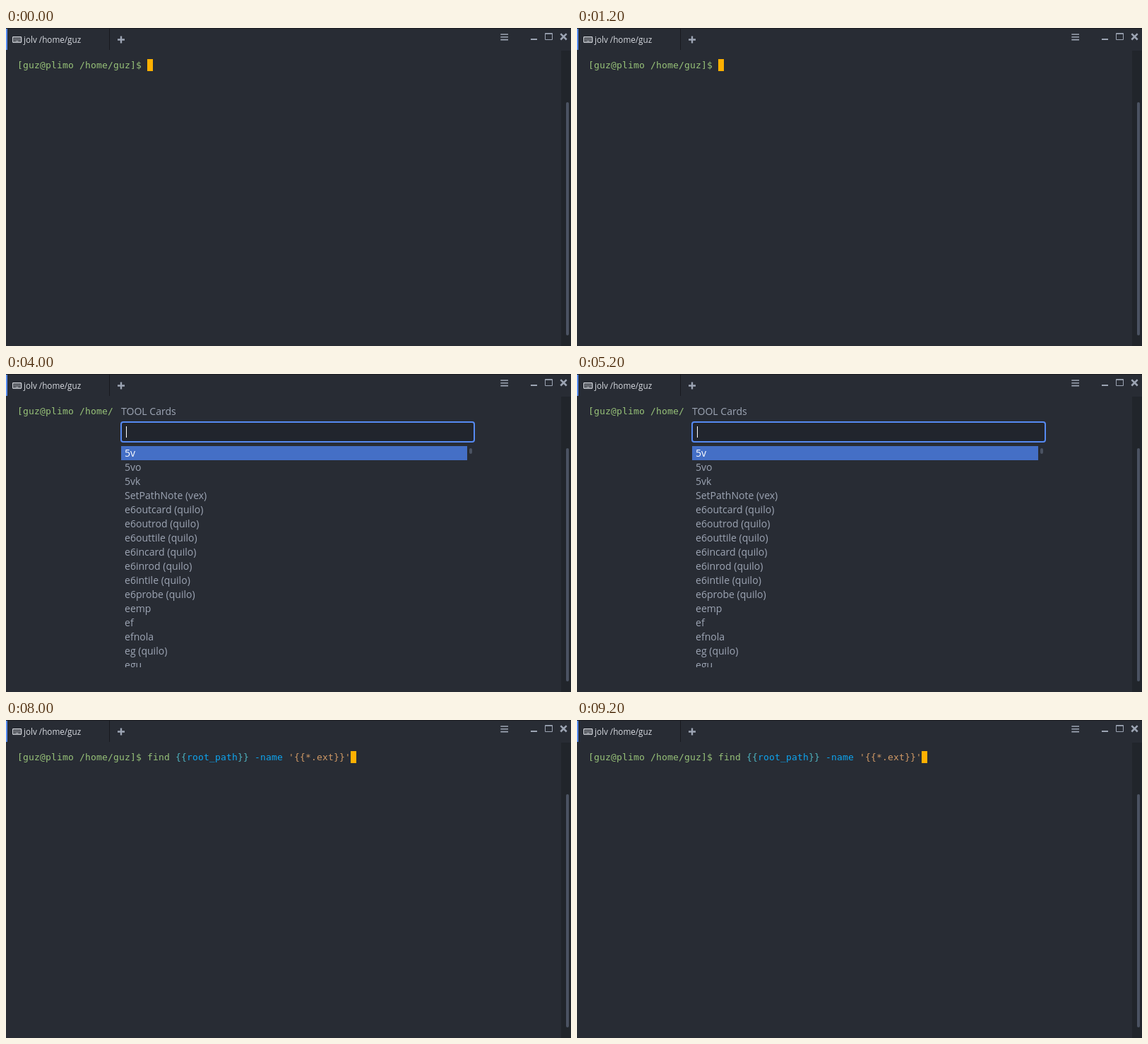
Write an HTML page that moves like this. It is 800 px wide and 450 px high and loops after 10 s.

```html
<!DOCTYPE html>
<html lang="en">
<head>
<meta charset="utf-8">
<title>Terminal command palette</title>
<style>
  :root {
    --bg: #282c34; --dark: #21252b; --line: #181a1f;
    --text: #9da5b4; --bright: #d7dae0; --accent: #568af2;
    --select: #446fc6; --thumb: #4b5362;
  }
  html, body { margin: 0; width: 100%; height: 100%; overflow: hidden; background: var(--bg); }
  #stage {
    position: relative; width: 800px; height: 450px; overflow: hidden;
    background: var(--bg); color: var(--text);
    font: 14.05px/20px "Open Sans", "Noto Sans", sans-serif;
  }
  #stage > *, .panel > * { position: absolute; white-space: pre; }

  .bar { left: 0; top: 0; fill: none; stroke: var(--text); }
  .tab { left: 25px; top: 8px; font-size: 11.7px; line-height: 16px; color: var(--bright); }
  .gutter { left: 786px; top: 32px; width: 14px; height: 418px; background: var(--dark); }
  .thumb { left: 793px; top: 105px; width: 4px; height: 330px; border-radius: 2px; background: var(--thumb); }

  .term {
    top: 44px; font: 13px/17px "DejaVu Sans Mono", monospace;
    letter-spacing: calc(8px - 1ch); color: #98c379;
  }
  .prompt { left: 16px; }
  .typed { left: 200px; }
  .cursor { display: inline-block; width: 8px; height: 17px; background: #ffb000; vertical-align: top; }
  .op { color: #4fb4c0; }
  .arg { color: #0ea5f0; }
  .str { color: #d19a66; }

  /* Each scene holds for a fifth of the loop. */
  .scene { visibility: hidden; animation: show 10s step-end infinite; animation-delay: calc((var(--n) - 5) * 2s); }
  @keyframes show { 0% { visibility: visible; } 20%, 100% { visibility: hidden; } }

  .panel { left: 152px; top: 33px; width: 522px; height: 400px; background: var(--bg); }
  .title { left: 11px; top: 10px; }
  .input {
    left: 10px; top: 34px; width: 502px; height: 30px; box-sizing: border-box;
    border: 2px solid var(--accent); border-radius: 4px; background: #21252d;
    padding: 3px 6px; color: var(--bright);
  }
  .caret { position: absolute; top: 5px; width: 1px; height: 16px; background: #fff; }
  .list { left: 11px; top: 69px; width: 500px; height: 313px; overflow: hidden; }
  .row { padding-left: 5px; }
  .row.on { background: var(--select); color: #fff; }
  .icons .row { padding-left: 53px; }
  .long .row { margin-right: 10px; }
  .nub { left: 504px; top: 72px; width: 4px; height: 8px; border-radius: 2px; background: var(--thumb); }
  .pencil { left: 35px; top: 70px; fill: var(--text); }
</style>
</head>
<body>
<div id="stage">
  <div class="gutter"></div>
  <div class="thumb"></div>
  <svg class="bar" width="800" height="32" viewBox="0 0 800 32">
    <path d="M0 .5H800M146.5 0V31" stroke="#181a1f"/>
    <path d="M1 1V31" stroke="#568af2" stroke-width="2"/>
    <g stroke="#d7dae0">
      <rect x="9.6" y="12.6" width="12" height="7.8" rx=".8" stroke-width="1.2"/>
      <path d="M11.3 14.7H20.3M11.3 16.5H20.3" stroke-width="1.1" stroke-dasharray="1.2 .75"/>
      <path d="M11.3 18.5H12.5M13.3 18.5H18M18.9 18.5H20.1" stroke-width="1.1"/>
    </g>
    <path d="M158 16.5H168M163 11.5V21.5" stroke-width="2.4"/>
    <path d="M700.3 9H711M700.3 12.8H711M700.3 16.6H711" stroke-width="1.6"/>
    <path d="M743 16H752" stroke-width="2"/>
    <path d="M763.5 7.5H773.5V16.5H763.5ZM763 8.3H774"/>
    <path d="M785.3 8.1L793.7 16.5M793.7 8.1L785.3 16.5" stroke-width="2.5"/>
  </svg>
  <div class="tab">jolv /home/guz</div>

  <div class="term prompt">[guz@plimo /home/guz]$ </div>
  <div class="term typed scene" style="--n:0"><span class="cursor"></span></div>
  <div class="term typed scene" style="--n:4">find <span class="op">{{</span><span class="arg">root_path</span><span class="op">}}</span> <span class="arg">-name</span> <span class="str">'{{*.ext}}'</span><span class="cursor"></span></div>
</div>

<script>
  const stage = document.getElementById("stage");

  const pencil = `<svg class="pencil" width="17" height="17" viewBox="0 0 17 17">
    <path d="M1 16L1.8 11.6L10 3.4L13.6 7L5.4 15.2ZM10.9 2.5L12.3 1.2Q13 .6 13.7 1.2L15.8 3.3Q16.4 4 15.8 4.7L14.5 6.1Z"/></svg>`;

  function addPanel({ n, title, rows, on = 0, typed = "", caret, kind = "", extra = "" }) {
    const mark = caret === undefined ? "" : `<i class="caret" style="left:${caret}px"></i>`;
    const items = rows.map((row, i) => `<div class="row${i === on ? " on" : ""}">${row}</div>`).join("");
    stage.insertAdjacentHTML("beforeend",
      `<div class="panel scene" style="--n:${n}"><div class="title">${title}</div>` +
      `<div class="input">${typed}${mark}</div><div class="list ${kind}">${items}</div>${extra}</div>`);
  }

  addPanel({
    n: 1, title: "Command Palette", typed: "tl", caret: 16, on: 1,
    kind: "icons", extra: pencil, rows: ["Edit Title", "TOOL Cards"]
  });

  addPanel({
    n: 2, title: "TOOL Cards", caret: 6, kind: "long", extra: '<div class="nub"></div>',
    rows: [
      "5v", "5vo", "5vk", "SetPathNote (vex)",
      ...["outcard", "outrod", "outtile", "incard", "inrod", "intile", "probe"].map(s => `e6${s} (quilo)`),
      "eemp", "ef", "efnola", "eg (quilo)", "egu"
    ]
  });

  addPanel({
    n: 3, title: "Find files or directories under the given directory tree, recursively.",
    rows: [
      "Find files by extension",
      "Find files by matching multiple patterns",
      "Find directories matching a given name, in case-insensitive mode",
      "Find files matching a path pattern",
      "Find files matching a given pattern, excluding specific paths",
      "Find files matching a given size range",
      "Run a command for each file (use `{}` within the command to access the<br>filename)",
      "Find files modified in the last 7 days, and delete them"
    ]
  });
</script>
</body>
</html>
```
